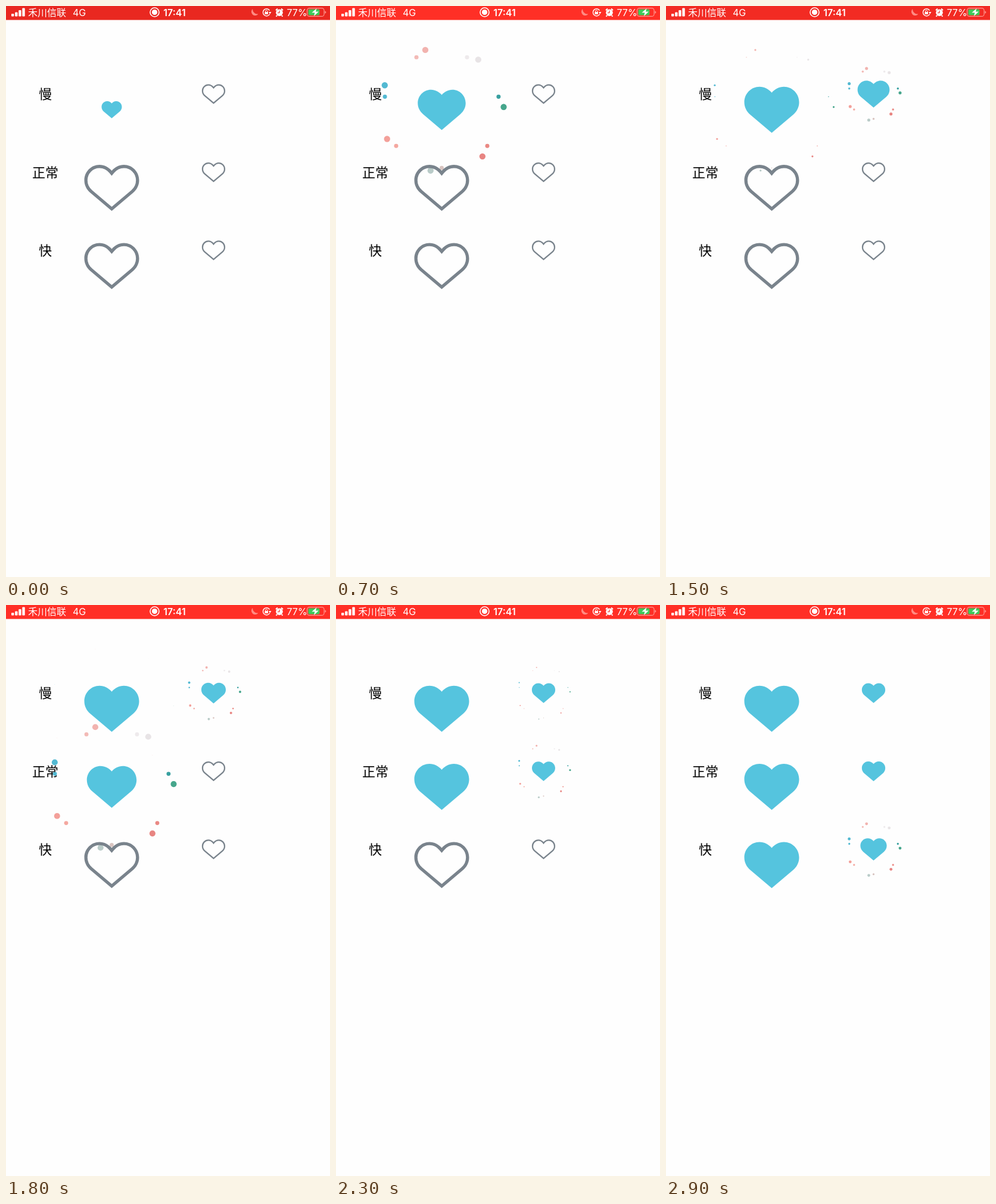
These frames come from a looping animation (544x960 px, 3 s). An HTML page with a canvas:

```html
<!DOCTYPE html>
<html lang="zh">
<head>
<meta charset="utf-8">
<style>
  html, body { margin: 0; width: 100%; height: 100%; overflow: hidden; background: #fefefe; }
  canvas { display: block; }
</style>
</head>
<body>
<canvas id="stage" width="544" height="960"></canvas>
<script>
const ctx = document.getElementById('stage').getContext('2d');
const TAU = Math.PI * 2, LOOP = 3000, STEP = 100;
const BLUE = '#55c4de';
const CJK = '"Noto Sans CJK SC", "Noto Sans CJK", sans-serif';
const LATIN = 'Inter, Roboto, sans-serif';

// burst: time the ring starts; pace: duration factor
const buttons = [
  { x: 177.5, y: 174.3, size: 145, burst: 111, pace: 1 },
  { x: 348.5, y: 148, size: 62, burst: 1083, pace: 1 },
  { x: 177.5, y: 305.6, size: 145, burst: 1665, pace: .22 },
  { x: 348.5, y: 279.5, size: 62, burst: 2096, pace: .22 },
  { x: 177.5, y: 437, size: 145, burst: 2514, pace: .1 },
  { x: 348.5, y: 410.8, size: 62, burst: 2851, pace: .1 }
];
const labels = [['慢', 149], ['正常', 280.5], ['快', 412]];
const sparkColors = [
  ['#f2b3af', '#f3bab6'], ['#e8e4e6', '#eeeaec'], ['#46a68c', '#38a0a0'],
  ['#e88582', '#ea8984'], ['#b9cbc8', '#d8c4c0'], ['#f3a09a', '#f4a8a0'], ['#53b9d2', '#53b9d2']
];

const heart = new Path2D(`M0 39 L-36 8.5 C-42 3.5 -46 -4 -46 -12.5 C-46 -27 -34.5 -38.5 -20.5 -38.5
  C-12.5 -38.5 -5 -34.5 0 -28.5 C5 -34.5 12.5 -38.5 20.5 -38.5
  C34.5 -38.5 46 -27 46 -12.5 C46 -4 42 3.5 36 8.5 Z`);

const clamp = v => Math.max(0, Math.min(1, v));
const mix = (a, b, k) => `rgb(${a.map((v, i) => Math.round(v + (b[i] - v) * k))})`;
const elastic = t => t >= 1 ? 1 : 1 - 2 ** (-10 * t) * Math.cos(TAU * t / .3);

function disc(x, y, r, color) {
  ctx.fillStyle = color;
  ctx.beginPath();
  ctx.arc(x, y, Math.max(0, r), 0, TAU);
  ctx.fill();
}

function strokePath(d, color, width) {
  ctx.strokeStyle = color;
  ctx.lineWidth = width;
  ctx.stroke(new Path2D(d));
}

function fillPath(d, color) {
  ctx.fillStyle = color;
  ctx.fill(new Path2D(d));
}

function text(str, x, y, font, color, align = 'left') {
  ctx.font = font;
  ctx.fillStyle = color;
  ctx.textAlign = align;
  ctx.fillText(str, x, y);
}

function drawHeart(scale, filled) {
  ctx.save();
  ctx.scale(scale, scale);
  if (filled) {
    ctx.fillStyle = BLUE;
    ctx.fill(heart);
  } else {
    ctx.clip(heart);
    ctx.strokeStyle = '#79838c';
    ctx.lineWidth = 10.6;
    ctx.stroke(heart);
  }
  ctx.restore();
}

function drawRing(size, age) {
  const radius = size * .65 * clamp(age / 150);
  const width = radius * (1 - clamp((age - 150) / 162));
  ctx.strokeStyle = mix([85, 196, 222], [246, 145, 139], clamp(age / 150));
  ctx.lineWidth = width;
  ctx.beginPath();
  ctx.arc(0, 0, radius - width / 2, 0, TAU);
  ctx.stroke();
}

function drawSparks(size, age) {
  const reach = size * .718 * (1 - .2 * (1 - clamp((age - 240) / 170)) ** 2);
  const outer = size * .0445 * (1 - clamp((age - 300) / 1450));
  const inner = size * .031 * (1 - clamp((age - 300) / 1300));
  sparkColors.forEach(([first, second], i) => {
    const a = (i - .5) * TAU / 7;
    const b = a + .181;
    disc(Math.sin(b) * reach, -Math.cos(b) * reach, outer, first);
    disc(Math.sin(a) * reach * .94, -Math.cos(a) * reach * .94, inner, second);
  });
}

function drawButton({ x, y, size, burst, pace }, time) {
  const age = (time - burst) / pace;
  const unit = size / 145;
  ctx.save();
  ctx.translate(x, y);
  if (age < -300) drawHeart(unit, false);
  else if (age < 0) drawHeart(unit * -age / 300, true);
  else {
    if (age < 312) drawRing(size, age);
    if (age > 290) {
      drawHeart(unit * elastic((age - 290) / 1000), true);
      if (age < 1750) drawSparks(size, age);
    }
  }
  ctx.restore();
}

function drawStatusBar(time) {
  const pulse = Math.max(0, Math.cos(TAU * (time - 90) / 1250)) ** 2;
  ctx.fillStyle = mix([255, 47, 38], [228, 38, 31], pulse);
  ctx.fillRect(0, 0, 544, 23.5);

  ctx.fillStyle = '#fff';
  [4.5, 7, 10.5, 14].forEach((h, i) => {
    ctx.beginPath();
    ctx.roundRect(9 + i * 6.1, 17.5 - h, 4.4, h, 1);
    ctx.fill();
  });
  text('禾川信联', 37, 17, `16px ${CJK}`, '#fff');
  text('4G', 112, 17, `16px ${LATIN}`, '#fff');

  disc(249.5, 10.5, 4.6, '#fff');
  strokePath('M257 10.5a7.5 7.5 0 1 1-15 0a7.5 7.5 0 1 1 15 0', '#fff', 1.6);
  text('17:41', 283, 16.5, `600 16px ${LATIN}`, '#fff', 'center');

  // moon, rotation lock, alarm
  fillPath('M414 5a6.4 6.4 0 1 0 9.5 8.5a8.5 8.5 0 0 1-9.5-8.5z', '#ff8c84');
  strokePath('M442.5 7.5a6 6 0 1 0 .3 6', '#fff', 1.4);
  fillPath('M441 10h4.5l-2.3 3.5zM434.5 10h5.5v4h-5.5z', '#fff');
  strokePath('M435.6 10v-1.2a1.7 1.7 0 0 1 3.4 0v1.2', '#fff', 1);
  disc(459, 11.2, 5.8, '#fff');
  strokePath('M453 7.3l3-2.8M465 7.3l-3-2.8M455 16l-1.5 1.7M463 16l1.5 1.7', '#fff', 2);
  strokePath('M459 7.8v3.7h-3', '#ee3028', 1.2);

  text('77%', 471.5, 17, `16px ${LATIN}`, '#fff');
  ctx.strokeStyle = '#ff9790';
  ctx.lineWidth = 1.2;
  ctx.beginPath();
  ctx.roundRect(505.6, 3.6, 28.5, 13.8, 4);
  ctx.stroke();
  ctx.fillStyle = '#3ccb5a';
  ctx.beginPath();
  ctx.roundRect(507.5, 5.5, 19, 10, 2);
  ctx.fill();
  fillPath('M535.5 8.3a2.3 2.3 0 0 1 0 4.5z', '#ff9790');
  fillPath('M521.5 4l-8 7.2h5l-1.5 5.8l8-7.5h-5z', '#fff');
}

function draw(time) {
  ctx.fillStyle = '#fefefe';
  ctx.fillRect(0, 0, 544, 960);
  drawStatusBar(time);
  for (const [str, y] of labels) text(str, 66, y + 7.2, `22px ${CJK}`, '#000', 'center');
  for (const button of buttons) drawButton(button, time);
}

const start = performance.now();
function tick() {
  const time = (performance.now() - start) % LOOP;
  draw(Math.floor(time / STEP) * STEP);
  requestAnimationFrame(tick);
}
tick();
</script>
</body>
</html>
```
